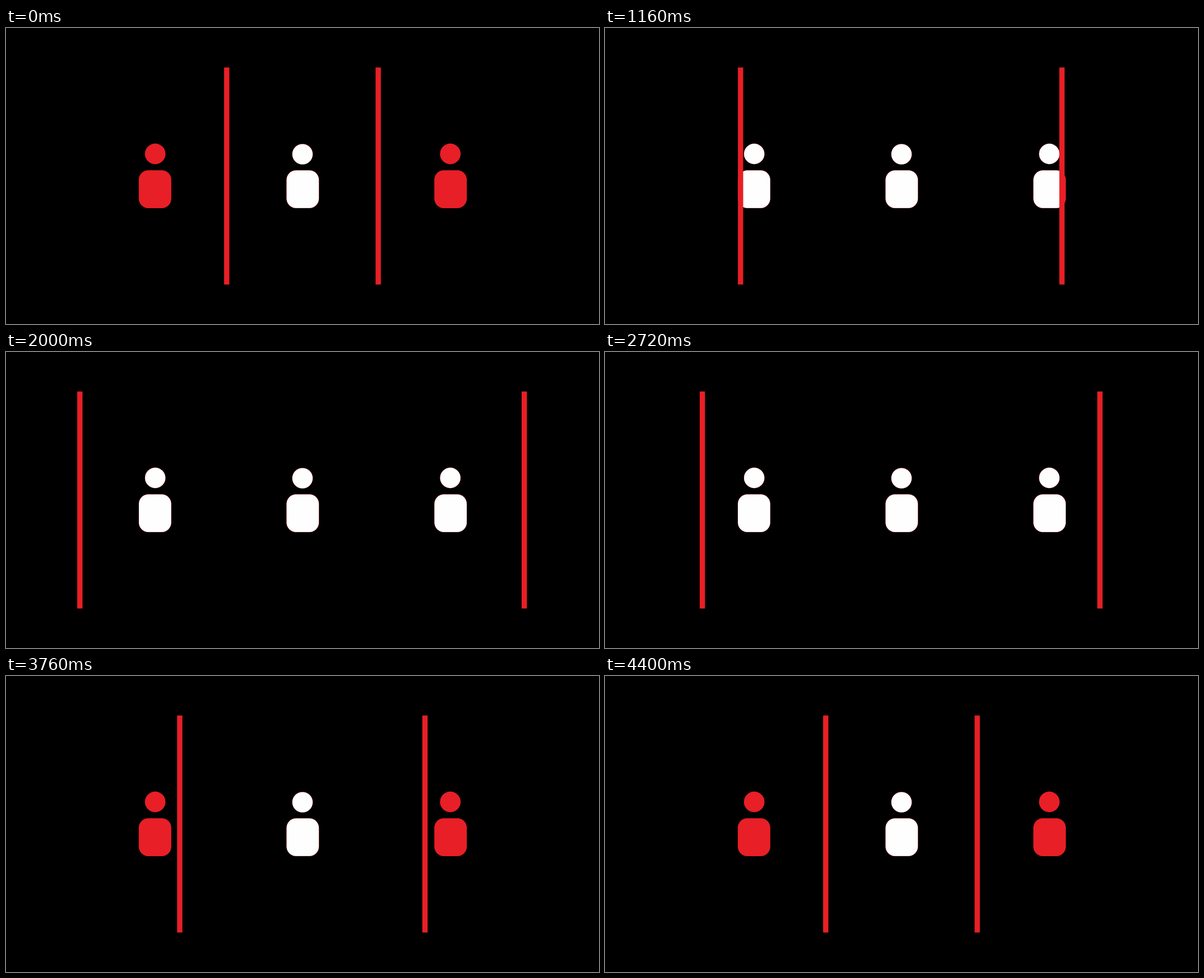
An HTML page with a canvas that plays this animation: 1058x529 px, repeating every 4.8 s.

```html
<!DOCTYPE html>
<html lang="en">
<head>
<meta charset="utf-8">
<title>Widening bars</title>
<style>
  html, body { margin: 0; width: 100%; height: 100%; overflow: hidden; background: #000; }
  canvas { display: block; width: 100%; height: 100%; }
</style>
</head>
<body>
<canvas id="stage" width="1058" height="529"></canvas>
<script>
const ctx = document.getElementById('stage').getContext('2d');
const W = 1058, H = 529;
const RED = '#e81f26', WHITE = '#fefefe';
const LOOP = 4800, STEP = 40, TRAVEL = 2000, RETURN_AT = 2400;
const BAR = { top: 70.6, height: 387.8, width: 9.4 };
const people = [
  { head: 266.2, body: 265.9, y: 225 },
  { head: 529, body: 529.4, y: 225.6 },
  { head: 792.7, body: 793.2, y: 225 }
];

const clamp = v => Math.min(1, Math.max(0, v));
const mix = (a, b, k) => a + (b - a) * k;

// 0 = bars close together, 1 = bars fully apart
function spread(t) {
  return clamp(t / TRAVEL) - clamp((t - RETURN_AT) / TRAVEL);
}

function drawPeople(color, grow) {
  ctx.fillStyle = color;
  for (const p of people) {
    ctx.beginPath();
    ctx.arc(p.head, p.y, 18.2 + grow, 0, Math.PI * 2);
    ctx.fill();
    ctx.beginPath();
    ctx.roundRect(p.body - 28.8 - grow, 254.5 - grow, 57.6 + 2 * grow, 67.3 + 2 * grow, 17);
    ctx.fill();
  }
}

function drawBar(x) {
  ctx.fillStyle = RED;
  ctx.fillRect(x, BAR.top, BAR.width, BAR.height);
}

function draw(t) {
  const k = spread(t);
  const left = mix(389.1, 127.1, k);
  const right = mix(659.4, 920, k);

  ctx.fillStyle = '#000';
  ctx.fillRect(0, 0, W, H);
  drawPeople(RED, 0.2);

  // people between the bars turn white
  ctx.save();
  ctx.beginPath();
  ctx.rect(left + BAR.width / 2, 0, right - left, H);
  ctx.clip();
  drawPeople(WHITE, 0);
  ctx.restore();

  drawBar(left);
  drawBar(right);
}

const start = performance.now();
function tick() {
  const t = (performance.now() - start) % LOOP;
  draw(Math.floor(t / STEP) * STEP);
  requestAnimationFrame(tick);
}
tick();
</script>
</body>
</html>
```
